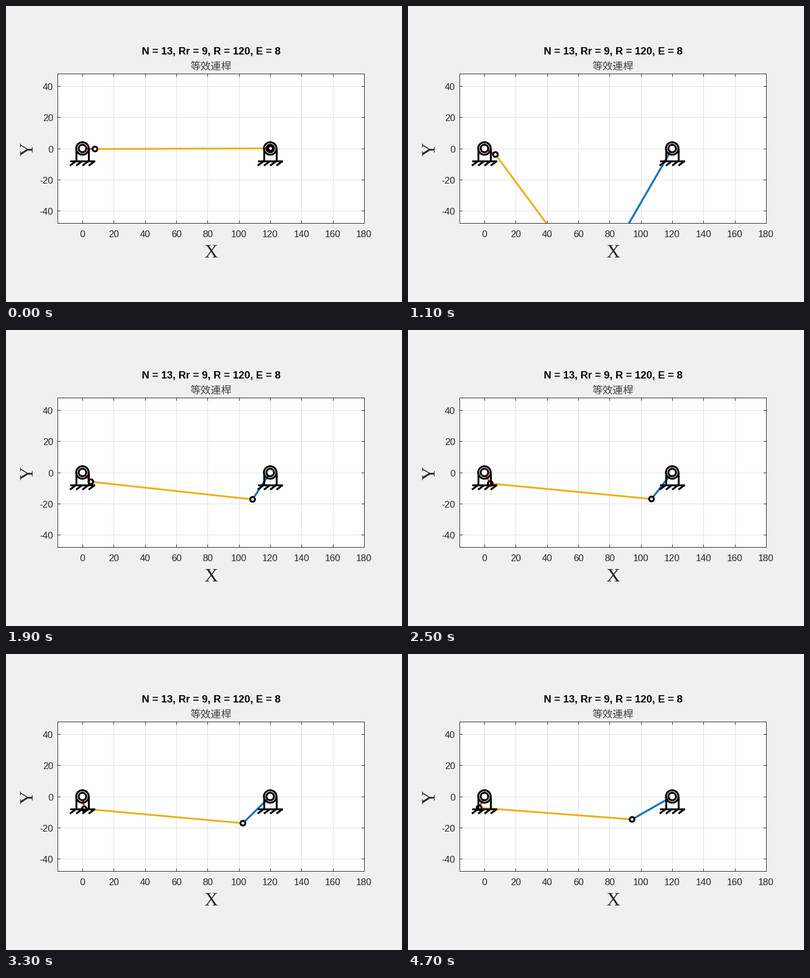
Recreate the animation shown at these times as a matplotlib script. Size 700 px wide and 525 px high, loop 4800 ms.

```python
import numpy as np
import matplotlib.pyplot as plt
from matplotlib.animation import FuncAnimation
from matplotlib.patches import Circle

W, H = 700, 525
PX = 0.72                       # points per pixel at 100 dpi
LEFT, RIGHT, TOP, BOTTOM = 90.9, 633, 120, 385.4
XLIM, YLIM = (-16, 180), (-48, 48)
SCALE = (RIGHT - LEFT) / (XLIM[1] - XLIM[0])
LW = 3.33 * PX

N, RR, R, E = 13, 9, 120, 8     # pins, pin radius, pin circle, eccentricity
FRAMES, STEP = 48, np.radians(2.4)
BLUE, ORANGE, YELLOW = "#0072BD", "#D95319", "#EDB120"
GREY = "#262626"
PIN = np.array([R, 0.0])


def joints(k):
    """Crank pin and centre of curvature of the disc profile (Euler-Savary)."""
    a = -STEP * (k + 1)
    u = np.array([np.cos(a), np.sin(a)])
    pole = N * E * u
    ray = PIN - pole
    dist = np.hypot(*ray)
    ray /= dist
    bend = 1 / (N * E) - 1 / ((N - 1) * E)
    reach = 1 / (1 / dist + bend / (ray @ u))
    return E * u, pole + reach * ray


fig = plt.figure(figsize=(W / 100, H / 100), dpi=100, facecolor="#F0F0F0")
ax = fig.add_axes([LEFT / W, 1 - BOTTOM / H, (RIGHT - LEFT) / W, (BOTTOM - TOP) / H])
ax.set(xlim=XLIM, ylim=YLIM, xticks=range(0, 181, 20), yticks=range(-40, 41, 20))
ax.set_axisbelow(True)
ax.grid(color="#DFDFDF", lw=PX)
ax.tick_params(direction="in", length=5.4 * PX, width=PX, color=GREY, top=True,
               right=True, labelbottom=False, labelleft=False)
for spine in ax.spines.values():
    spine.set(color=GREY, linewidth=PX)


def text(x, y, s, size, font="Liberation Sans", ha="center", color=GREY, **kw):
    return fig.text(x / W, 1 - y / H, s, fontsize=size * PX, family=font, ha=ha,
                    va="baseline", color=color, **kw)


def line(xs, ys, color="k", z=6):
    return ax.plot(xs, ys, color=color, lw=LW, zorder=z, solid_capstyle="butt")[0]


def ring(x, y, radius, z, face="w"):
    return ax.add_patch(Circle((x, y), radius, fc=face, ec="k", lw=LW, zorder=z))


def support(x):
    for side in (-4, 4):
        line([x + side] * 2, [0, -8])
    line([x - 8, x + 8], [-8, -8])
    for d in (-4, 0, 4, 8):
        line([x + d, x + d - 4], [-8, -11])
    ring(x, 0, 4, 6, "none")
    ring(x, 0, 6.67 / SCALE, 4)


for v in ax.get_xticks():
    text(LEFT + (v - XLIM[0]) * SCALE, 410.3, f"{v:d}", 16.67)
for v in ax.get_yticks():
    y = (TOP + BOTTOM) / 2 - v * (BOTTOM - TOP) / (YLIM[1] - YLIM[0])
    text(83.5, y + 7, f"{v:d}", 16.67, ha="right")
text(362.6, 86.3, f"N = {N}, Rr = {RR}, R = {R}, E = {E}", 18.33, color="k", weight="bold")
text(362.5, 112.5, "等效連桿", 18.33, "Noto Sans CJK JP", color="#404040", weight="light")
text(362.2, 446, "X", 33.33, "Liberation Serif")
text(48, 253.5, "Y", 33.33, "Liberation Serif", rotation=90, rotation_mode="anchor")

follower = line([], [], BLUE, 3)
crank = line([], [], ORANGE, 3.1)
coupler = line([], [], YELLOW, 3.2)
support(0)
support(R)
knobs = [ring(0, 0, 4.17 / SCALE, 5) for _ in range(2)]


def update(k):
    c, q = joints(k)
    for bar, a, b in ((follower, PIN, q), (crank, (0, 0), c), (coupler, c, q)):
        bar.set_data([a[0], b[0]], [a[1], b[1]])
    for knob, p in zip(knobs, (c, q)):
        knob.center = tuple(p)
    return follower, crank, coupler, *knobs


anim = FuncAnimation(fig, update, frames=FRAMES, interval=100,
                     init_func=lambda: update(0), repeat=True, repeat_delay=0)
plt.show()
```
